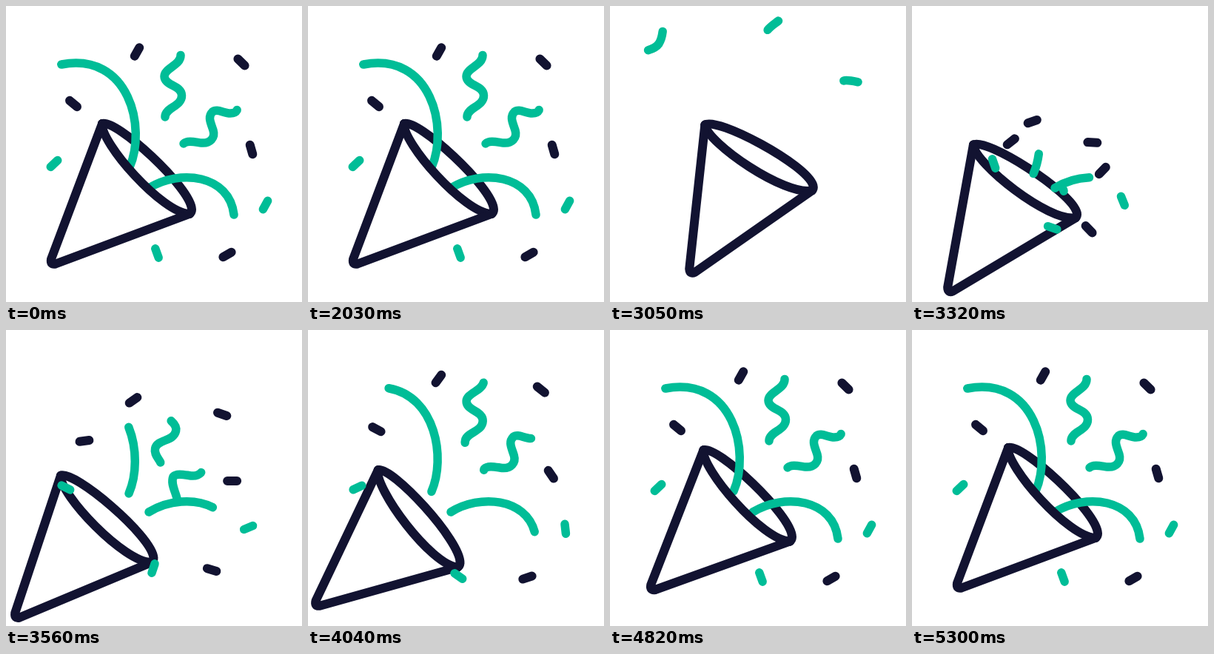
An HTML page for the animation above (5.33 s loop, 400 by 400 pixels).

```html
<!DOCTYPE html>
<html lang="en">
<head>
<meta charset="utf-8">
<title>Party popper</title>
<style>
  html, body { margin: 0; height: 100%; overflow: hidden; background: #fff; }
  svg { display: block; width: 100vw; height: 100vh; fill: none; stroke-linecap: round; stroke-linejoin: round; }
  .navy { stroke: #121331; stroke-width: 12; }
  .teal { stroke: #00bd97; stroke-width: 11.5; }
</style>
</head>
<body>
<svg viewBox="0 0 400 400">
  <g class="cone navy"><path d="M130 159C148 152 250 245 251 275Q251 279 248 281"/></g>
  <g id="streamers"></g>
  <g class="cone navy">
    <path d="M130 159C127 184 211 280 248 281"/>
    <path d="M130 159L61 342Q59.5 350 67 348.5L248 281"/>
  </g>
  <g id="dashes"></g>
</svg>
<script>
const LOOP = 5330, OUT = 2030, GONE = 3150, POP = 3160;
const NS = 'http://www.w3.org/2000/svg';

const clamp = v => Math.min(1, Math.max(0, v));
const span = (t, a, b) => clamp((t - a) / (b - a));
const mix = (a, b, p) => a + (b - a) * p;
const easeOut = (u, n) => 1 - Math.pow(1 - u, n);

// Timing curve with control heights 0 and 1
function bezier(x1, x2) {
  return u => {
    let lo = 0, hi = 1;
    for (let i = 0; i < 24; i++) {
      const s = (lo + hi) / 2, r = 1 - s;
      if (3 * r * r * s * x1 + 3 * r * s * s * x2 + s * s * s < u) lo = s; else hi = s;
    }
    return lo * lo * (3 - 2 * lo);
  };
}
const soft = bezier(.33, .67), kick = bezier(.5, .3), settle = bezier(.5, .4), back = bezier(.33, .4);

// Keys are [time, value, easing from the previous key]
function track(keys, t) {
  if (t <= keys[0][0]) return keys[0][1];
  for (let i = 1; i < keys.length; i++) {
    const [a, from] = keys[i - 1], [b, to, ease] = keys[i];
    if (t < b) return mix(from, to, ease(span(t, a, b)));
  }
  return keys[keys.length - 1][1];
}
const coneX = [[OUT, 0], [3080, 23.5, soft], [3550, -52, kick], [5300, 0, settle]];
const coneY = [[OUT, 0], [3080, -6, soft], [3550, 37, kick], [5300, 0, settle]];
const coneTurn = [[OUT, 0], [3080, -14.5, soft], [3900, 5, soft], [5300, 0, back]];

function addPath(parent, cls, d) {
  const el = document.createElementNS(NS, 'path');
  el.setAttribute('class', cls);
  el.setAttribute('d', d);
  document.getElementById(parent).append(el);
  return el;
}

// Each ribbon: lead-in, resting body, way out; growth window and power; drift and spin
const streamers = [
  { lead: 'M167 218', body: 'C190 165 167 62 75 79',
    exit: 'C55 82 40 76 42 66C44 58 58 62 66 51C71 43 72 32 72 17',
    from: 3234, to: 4900, pow: 2.7, dx: -1, dy: 3, spin: 0 },
  { lead: 'M193 246', body: 'C235 220 302 228 308 282',
    exit: 'C314 340 370 380 360 520',
    from: 3110, to: 4580, pow: 2.7, dx: 0, dy: 0, spin: 0 },
  { lead: 'M226 167C221 161 215 158 215 150',
    body: 'C215 137 237.5 136 237.5 121C237.5 107 214 108 214 95C214 84 236 80 236 67',
    exit: 'C236 54 210 52 211 38C212 28 225 24 237 12',
    from: 3327, to: 4300, pow: 3, dx: -5, dy: 13.5, spin: 12 },
  { lead: 'M245 216C243 206 236 196 240 186',
    body: 'C245 181 256 184 264 185C276 186 283 178 280 168C277 158 272 150 279 143C285 138 294 145 303 145C309 145 311 143 312 141',
    exit: 'C317 128 305 112 311 104C317 97 328 102 347 105',
    from: 3315, to: 4564, pow: 3, dx: -14, dy: 12, spin: 0 }
].map(s => {
  const el = addPath('streamers', 'teal', s.lead);
  const measure = d => (el.setAttribute('d', d), el.getTotalLength());
  const tail = measure(s.lead), head = measure(s.lead + s.body), end = measure(s.lead + s.body + s.exit);
  const mid = el.getPointAtLength((tail + head) / 2);
  return { ...s, el, tail, head, end, mid };
});

// x, y, angle at rest; then offset and spin soon after the pop
const dashes = [
  ['navy', 177, 62, -60, -5, 33, 25],
  ['navy', 318, 76, 45, -26, 38, -26],
  ['navy', 91, 132, 40, 15, 18, -48],
  ['navy', 331.5, 194, 74, -26, 10, -74],
  ['navy', 299, 336, -30, -21, -12, 47],
  ['teal', 65, 213, -43, 16, 0, 70],
  ['teal', 204, 334, 70, -5, -12, -142],
  ['teal', 350.5, 269, -61, -23, -2, -142]
].map(([cls, x, y, a, dx, dy, spin]) => ({ el: addPath('dashes', cls, 'M-6.5 0H6.5'), x, y, a, dx, dy, spin }));

const cones = document.querySelectorAll('.cone');
const pull = t => t < POP || t > 4720 ? 0 : Math.exp((3560 - t) / 228);
const twist = t => t < POP ? 0 : Math.pow(Math.max(0, 4720 - t) / 1160, 2.6);

function drawStreamer(s, t) {
  let tail, head;
  if (t < GONE) {
    const p = span(t, OUT, GONE) ** 2;
    tail = mix(s.tail, s.end, p);
    head = mix(s.head, s.end, p);
  } else {
    head = s.head * easeOut(span(t, s.from, s.to), s.pow);
    tail = s.tail * easeOut(span(t, 3560, 4200), 2);
  }
  const len = head - tail, k = pull(t);
  s.el.style.display = len > .5 ? '' : 'none';
  s.el.setAttribute('stroke-dasharray', `${Math.max(len, .5)} 9999`);
  s.el.setAttribute('stroke-dashoffset', -tail);
  s.el.setAttribute('transform',
    `translate(${s.dx * k} ${s.dy * k}) rotate(${s.spin * twist(t)} ${s.mid.x} ${s.mid.y})`);
}

function drawDash(d, t) {
  let { x, y, a } = d, size = 1;
  if (t < POP) {
    const far = 300 * span(t, OUT, 2900) ** 2;
    const vx = x - 190, vy = y - 219, r = Math.hypot(vx, vy);
    x += vx / r * far;
    y += vy / r * far;
    if (t > 2900) size = 0;
  } else {
    const k = pull(t);
    x += d.dx * k;
    y += d.dy * k;
    a += d.spin * twist(t);
    size = span(t, POP, POP + 150);
  }
  d.el.style.display = size ? '' : 'none';
  d.el.setAttribute('transform', `translate(${x} ${y}) rotate(${a}) scale(${size})`);
}

function render(t) {
  const move = `translate(${track(coneX, t)} ${track(coneY, t)}) rotate(${track(coneTurn, t)} 147.3 261.7)`;
  cones.forEach(c => c.setAttribute('transform', move));
  streamers.forEach(s => drawStreamer(s, t));
  dashes.forEach(d => drawDash(d, t));
}

const start = performance.now();
function tick() {
  render((performance.now() - start) % LOOP);
  requestAnimationFrame(tick);
}
tick();
</script>
</body>
</html>
```
